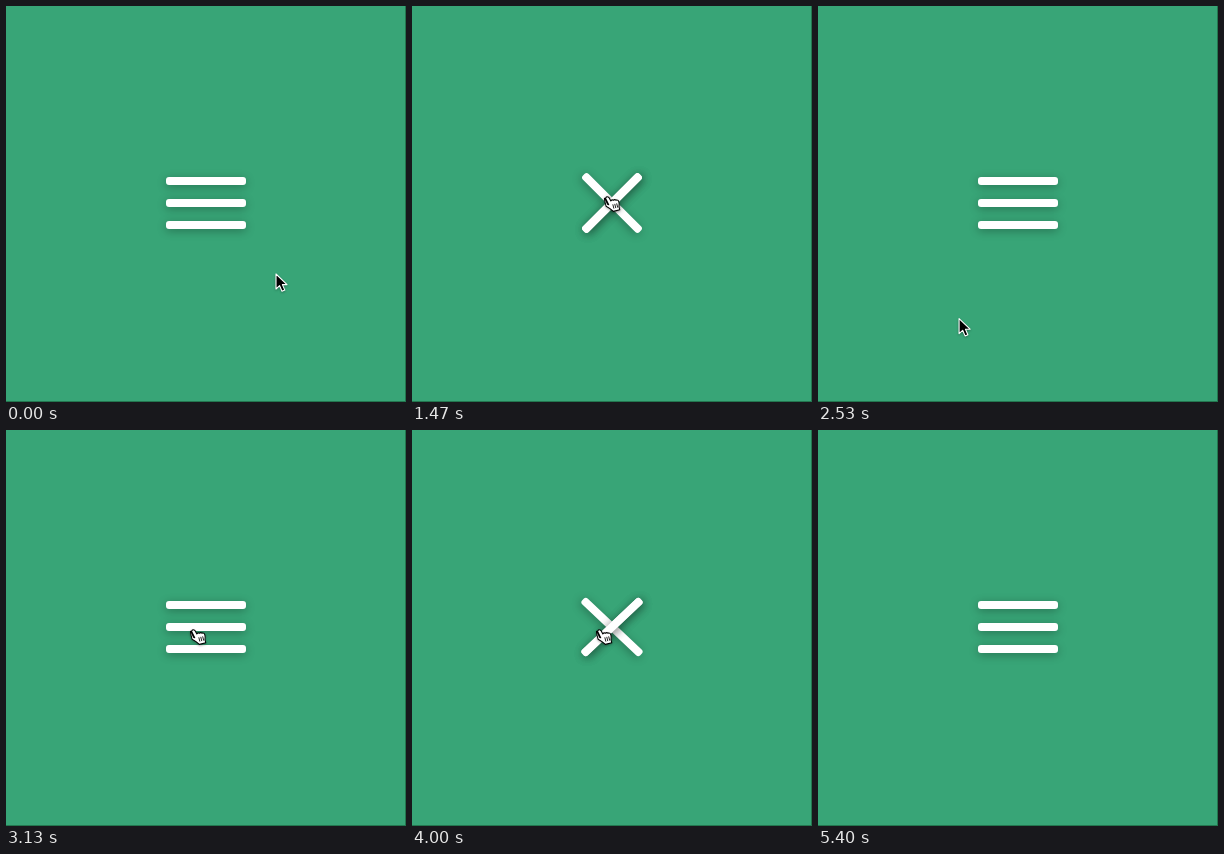
These frames come from a looping animation (400 by 396 pixels, 6070 ms). An HTML page:

```html
<!DOCTYPE html>
<html lang="en">
<head>
<meta charset="utf-8">
<title>Menu icon</title>
<style>
  html, body { margin: 0; width: 100%; height: 100%; overflow: hidden; }
  #stage {
    position: relative; width: 400px; height: 396px; overflow: hidden;
    box-sizing: border-box; background: #38a577;
    border: solid #23774f; border-width: 0 1px 1px 0;
  }
  .bar {
    position: absolute; left: 159.5px; top: 193px; width: 80px; height: 8px;
    border-radius: 3px; background: #fff; box-shadow: 0 2px 10px rgba(0, 0, 0, .3);
  }
  svg { position: absolute; left: 0; top: 0; filter: drop-shadow(0 1px 1px rgba(0, 0, 0, .3)); }
</style>
</head>
<body>
<div id="stage">
  <div class="bar"></div>
  <div class="bar"></div>
  <div class="bar"></div>
  <svg width="400" height="396">
    <g id="cursor" stroke-linejoin="round" stroke-linecap="round">
      <path id="arrow" d="M0 1V16L3.6 12.7L6 18.3L8.8 17.1L6.4 11.6H11Z" fill="#000" stroke="#fff" stroke-width="1.1"/>
      <g id="hand" stroke="#000" stroke-width="1.2" transform="rotate(-14) scale(.86 .94)">
        <path fill="#fff" d="M-2 1Q0-1.5 2 1L3.2 5Q5 3.8 6.4 5Q8 4.2 9.4 5.6Q12 5.6 12 8Q12 11 10.8 13V16.5H3.2Q1 13-3.6 9.2Q-4-7 -1.4 7.6L-.2 8.4Z"/>
        <path fill="none" stroke-width=".9" d="M4.5 9.5V13.3M6.8 9.5V13.3M9.1 9.5V13.3"/>
      </g>
    </g>
  </svg>
</div>
<script>
const LOOP = 6070, STEP = 1000 / 15, HALF = 400, GAP = 22;
const $ = id => document.getElementById(id);
const [topBar, midBar, lowBar] = document.querySelectorAll('.bar');

// Clicks alternately open and close the icon.
const clicks = [605, 1722, 3330, 4460];

// Each pointer move is a Bézier curve through its points.
const moves = [
  { from: 70, to: 470, points: [[270, 267], [190, 190], [150, 165], [195, 191]] },
  { from: 1800, to: 2000, points: [[195, 191], [197, 198]] },
  { from: 2130, to: 3000, points: [[197, 198], [230, 350], [0, 350], [187, 200]] },
  { from: 4870, to: 5000, points: [[187, 200], [331, 86]] }
];
const POINTER_GONE = 5060;

const clamp = v => Math.min(1, Math.max(0, v));
const lerp = (a, b, k) => a + (b - a) * k;
const easeOut = k => 1 - (1 - k) ** 3;
const progress = (t, from, to) => clamp((t - from) / (to - from));

function bezier(points, k) {
  if (points.length === 1) return points[0];
  const inner = points.slice(1).map(([x, y], i) =>
    [lerp(points[i][0], x, k), lerp(points[i][1], y, k)]);
  return bezier(inner, k);
}

function pointerAt(t) {
  const move = moves.findLast(m => m.from <= t) || moves[0];
  return bezier(move.points, progress(t, move.from, move.to));
}

// Opening collapses the bars, then crosses them; closing does the reverse.
function iconState(t) {
  const index = clicks.findLastIndex(start => start <= t);
  if (index < 0) return [0, 0];
  const middle = clicks[index] + HALF;
  const first = easeOut(progress(t, clicks[index], middle));
  const second = easeOut(progress(t, middle, middle + HALF));
  return index % 2 ? [1 - second, 1 - first] : [first, second];
}

function place(bar, y, angle) {
  bar.style.transform = `translateY(${y}px) rotate(${angle}deg)`;
}

function draw(t) {
  const [collapse, cross] = iconState(t);
  const offset = GAP * (1 - collapse), angle = 45 * cross;
  place(topBar, -offset, angle);
  place(midBar, 0, -angle);
  place(lowBar, offset, -angle);

  const [x, y] = pointerAt(t);
  const overIcon = x > 159 && x < 240 && y > 171 && y < 223;
  $('cursor').setAttribute('transform', `translate(${x} ${y})`);
  $('cursor').style.display = t < POINTER_GONE ? '' : 'none';
  $('hand').style.display = overIcon ? '' : 'none';
  $('arrow').style.display = overIcon ? 'none' : '';
}

const begin = performance.now();
function tick() {
  const t = (performance.now() - begin) % LOOP;
  draw(Math.floor((t + 5) / STEP) * STEP); // the motion runs at 15 steps per second
  requestAnimationFrame(tick);
}
tick();
</script>
</body>
</html>
```
